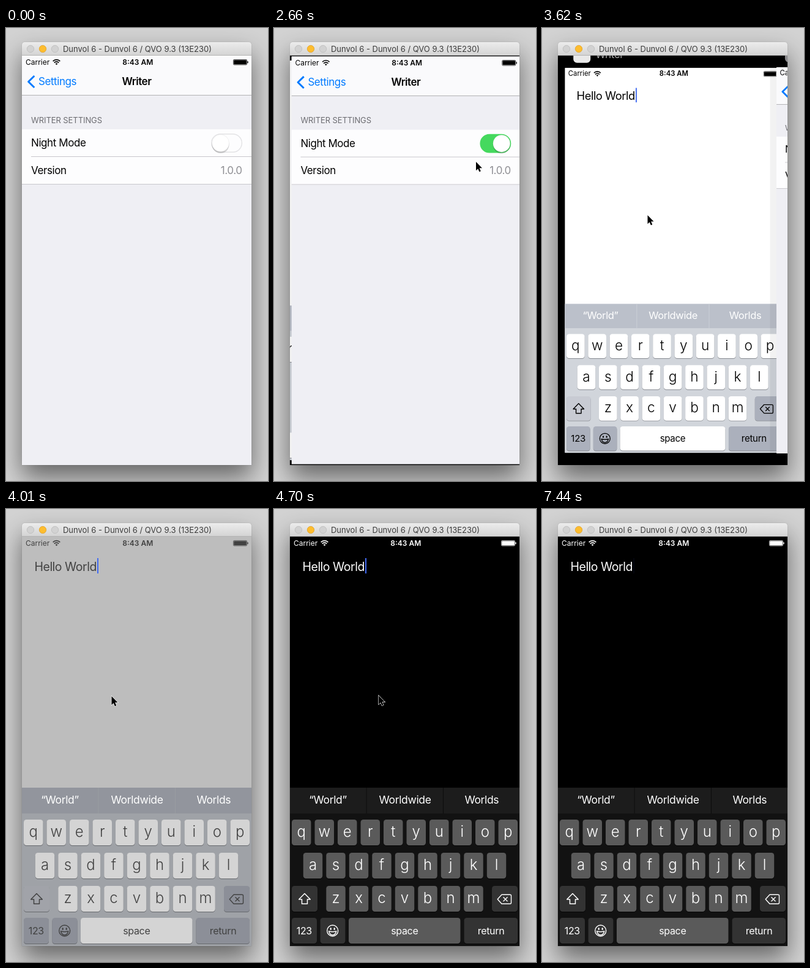
Recreate the animation shown at these times as an HTML page. Size 428 by 738 pixels, loop 7480 ms.

```html
<!DOCTYPE html>
<html lang="en">
<head>
<meta charset="utf-8">
<title>Night mode</title>
<style>
  html, body { margin: 0; width: 100%; height: 100%; overflow: hidden; background: #d3d3d3; }
  #window { position: absolute; left: 26px; top: 23px; width: 375px; height: 689px; border-radius: 5px 5px 0 0;
    box-shadow: 0 0 1px rgba(0,0,0,.5), 0 20px 42px rgba(0,0,0,.52); }
  svg { position: absolute; left: 0; top: 0; width: 428px; height: 738px; display: block; }
  text { font-family: Inter, Roboto, sans-serif; white-space: pre; }
</style>
</head>
<body>
<div id="window"></div>
<svg id="stage" viewBox="0 0 428 738"></svg>
<script>
const LOOP = 7480;

// ---- drawing helpers ----
const rect = (x, y, w, h, fill, extra = '') =>
  `<rect x="${x}" y="${y}" width="${w}" height="${h}" fill="${fill}" ${extra}/>`;
const text = (x, y, size, fill, str, extra = '', track = -.025) =>
  `<text x="${x}" y="${y}" font-size="${size}" fill="${fill}" letter-spacing="${track * size}" ${extra}>${str}</text>`;
const line = (d, color, width) =>
  `<path d="${d}" fill="none" stroke="${color}" stroke-width="${width}" stroke-linejoin="round"/>`;
const MID = 'text-anchor="middle"';

function statusBar(color) {
  return `<g class="status">` +
    text(6, 14.5, 12, color, 'Carrier', '', 0) +
    `<g transform="translate(56.5 14.5)">` +
      line('M-5.8-5.4A8 8 0 0 1 5.8-5.4M-3.7-2.9A5 5 0 0 1 3.7-2.9', color, 1.7) +
      `<path d="M-1.9-1.3Q0-3 1.9-1.3L0 .7Z" fill="${color}"/></g>` +
    text(189.3, 14.5, 12, color, '8:43 AM', MID + ' font-weight="600"', 0) +
    rect(345.4, 6.4, 22.2, 8.6, 'none', `rx="1.5" stroke="${color}" stroke-width=".7"`) +
    rect(346.2, 7.2, 20.6, 7, color, 'rx=".8"') +
    rect(368.2, 9.2, 1.4, 3, color) + `</g>`;
}

function settingsScreen() {
  const ink = '#000';
  return rect(0, 0, 375, 667, '#efeff4') +
    rect(0, 0, 375, 64, '#fafafc') + rect(0, 64, 375, 1, '#b2b2b4') +
    statusBar(ink) +
    line('M20.3 33L10.6 42.5L20.3 52', '#007aff', 3) +
    text(27, 48, 17, '#007aff', 'Settings') +
    text(187.5, 48, 17, ink, 'Writer', MID + ' font-weight="600"') +
    text(15, 109.5, 13, '#6d6d72', 'WRITER SETTINGS', '', -.006) +
    rect(0, 120, 375, 90, '#fdfdfe') +
    rect(15, 164, 360, 1, '#c8c7cc') + rect(0, 209, 375, 1, '#c8c7cc') +
    text(15, 148, 17, ink, 'Night Mode') +
    text(15, 193, 17, ink, 'Version') +
    text(359.5, 193, 17, '#8e8e93', '1.0.0', 'text-anchor="end"') +
    rect(309.7, 127.7, 49.6, 29.6, '#fdfdfe', 'id="track" rx="14.8" stroke="#e3e3e5" stroke-width="1.4"') +
    rect(0, 131, 28, 28, '#000', 'id="shade" rx="14" opacity=".17"') +
    rect(0, 128.5, 28, 28, '#fff', 'id="knob" rx="14" stroke="#000" stroke-opacity=".1" stroke-width=".6"');
}

const light = { bg: '#fff', ink: '#000', bar: '#bbc0ca', rule: '#cbcfd6', board: '#d1d5db',
  key: '#fff', alt: '#abb0bc', shift: '#c8cbd3', edge: '#898c92' };
const dark = { bg: '#000', ink: '#fff', bar: '#1c1c1c', rule: '#0c0c0c', board: '#121212',
  key: '#5a5a5a', alt: '#333', shift: '#333', edge: '#050505' };

function writerScreen(c) {
  const cap = (x, y, w, fill) => rect(x, y + 1, w, 42, c.edge, 'rx="4.5"') + rect(x, y, w, 42, fill, 'rx="4.5"');
  const row = (letters, x0, y) => [...letters].map((ch, i) => {
    const x = x0 + i * 37.5;
    return cap(x, y, 31.5, c.key) + text(x + 15.75, y + 28, 24, c.ink, ch, MID + ' font-weight="300"', 0);
  }).join('');
  const word = (x, str) => text(x, 435, 17.5, '#fff', str, MID, -.02);
  const label = (x, str) => text(x, 647.5, 16, c.ink, str, MID, -.02);

  return rect(0, 0, 375, 667, c.bg) + statusBar(c.ink) +
    text(20.5, 56, 19.5, c.ink, 'Hello World') +
    rect(123, 35, 2, 25, '#426bf2', 'class="caret"') +
    rect(0, 409, 375, 258, c.board) + rect(0, 409, 375, 42, c.bar) +
    rect(124.5, 409, 1, 42, c.rule) + rect(250, 409, 1, 42, c.rule) +
    word(62, '“World”') + word(188, 'Worldwide') + word(313.3, 'Worlds') +
    row('qwertyuiop', 3, 461) + row('asdfghjkl', 21.75, 515) + row('zxcvbnm', 59.25, 569) +
    cap(3, 569, 42, c.shift) + cap(330, 569, 42, c.alt) +
    cap(3, 621, 41, c.alt) + cap(49.5, 621, 41, c.alt) + cap(96, 621, 182.5, c.key) + cap(284.5, 621, 87.5, c.alt) +
    line('M24 581.5L33.3 591H28.5V598.3H19.5V591H14.7Z', c.ink, 1.5) +
    line('M346 583.3H359.5Q361.5 583.3 361.5 585.3V596.2Q361.5 598.2 359.5 598.2H346L339.2 590.7Z' +
      'M348.5 587.3L355.5 594.3M355.5 587.3L348.5 594.3', c.ink, 1.4) +
    `<g transform="translate(69.7 642)" fill="${c.ink}">` + line('M-9 0A9 9 0 1 1 9 0A9 9 0 1 1-9 0Z', c.ink, 1.4) +
      `<ellipse cx="-3" cy="-3" rx="1.2" ry="1.9"/><ellipse cx="3" cy="-3" rx="1.2" ry="1.9"/></g>` +
    `<path d="M63.7 643Q69.7 644.5 75.7 643Q74.5 649 69.7 649T63.7 643Z" fill="none" stroke="${c.ink}" stroke-width="1.4"/>` +
    label(23.3, '123') + label(187.3, 'space') + label(328.5, 'return');
}

const tag = (id, name, icon, color) => `<g id="${id}">` +
  rect(14, -36, 28, 28, icon, 'rx="6"') + text(50, -16, 17, color, name) + `</g>`;
const light_ = (x, fill, edge) =>
  `<circle cx="${x}" cy="34" r="5.7" fill="${fill}" stroke="${edge}" stroke-width=".8"/>`;

const $ = id => document.getElementById(id);
$('stage').innerHTML = `
  <defs>
    <linearGradient id="chrome" x2="0" y2="1"><stop stop-color="#ececec"/><stop offset="1" stop-color="#d3d3d3"/></linearGradient>
    <clipPath id="screen">${rect(26, 45, 375, 667, '#000')}</clipPath>
    <clipPath id="corners">${rect(0, 0, 375, 667, '#000', 'id="round"')}</clipPath>
  </defs>
  <path d="M26 45V28Q26 23 31 23H396Q401 23 401 28V45Z" fill="url(#chrome)"/>
  ${rect(26, 44, 375, 1, '#b4b4b4')}
  ${light_(40, '#d2d2d2', '#bcbcbc')}${light_(60, '#fdbd2f', '#dfa02a')}${light_(80, '#d2d2d2', '#bcbcbc')}
  ${text(214.5, 38.7, 13, '#3c3c3c', 'Dunvol 6 - Dunvol 6 / QVO 9.3 (13E230)', MID, 0)}
  <g clip-path="url(#screen)">
    ${rect(26, 45, 375, 667, '#000')}
    ${tag('writerTag', 'Writer', '#e9e9e9', '#a8a8a8')}
    <g id="writer" clip-path="url(#corners)">${writerScreen(light)}<g id="night">${writerScreen(dark)}</g></g>
    ${tag('settingsTag', 'Settings', '#8b8b8e', '#fff')}
    <g id="settings">
      ${rect(-11, 0, 16, 667, '#000', 'opacity=".05"')}
      <g clip-path="url(#corners)">${settingsScreen()}</g>
    </g>
  </g>
  <path id="cursor" d="M0 0V14.2L3.2 11.2L5.4 16.2L7.8 15.2L5.6 10.3H10Z" fill="#000" stroke="#fff" stroke-width="1.2" paint-order="stroke"/>`;

// ---- motion ----
const span = (t, a, b) => Math.min(1, Math.max(0, (t - a) / (b - a)));
const smooth = u => u * u * (3 - 2 * u);
const easeOut = (u, n) => 1 - (1 - u) ** n;
const mix = (a, b, u) => a + (b - a) * u;
const set = (id, attrs) => { for (const k in attrs) $(id).setAttribute(k, attrs[k]); };
const fadeAll = (selector, opacity) =>
  document.querySelectorAll(selector).forEach(el => el.setAttribute('opacity', opacity));

// poses are [x, scale] for: settings open, switcher settled, writer open
function placeCard(id, poses, opening, zoom) {
  const [x, s] = [0, 1].map(i => mix(mix(poses[0][i], poses[1][i], opening), poses[2][i], zoom));
  const y = 378.5 - 333.5 * s;
  set(id, { transform: `translate(${x} ${y}) scale(${s})` });
  set(id + 'Tag', { transform: `translate(${x} ${y})`, opacity: Math.min(1, opening * 1.02) });
}

function moveSwitch(t) {
  const on = smooth(span(t, 1470, 1700));
  const stretch = 7 * (smooth(span(t, 1360, 1460)) - smooth(span(t, 1580, 1730)));
  const width = 28 + stretch;
  const x = mix(310.5, 358.5 - width, on);
  const tint = (a, b) => Math.round(mix(a, b, on));
  set('knob', { x, width });
  set('shade', { x, width });
  set('track', {
    fill: `rgb(${tint(253, 69)},${tint(253, 217)},${tint(254, 94)})`,
    stroke: `rgb(${tint(227, 69)},${tint(227, 217)},${tint(229, 94)})`
  });
}

// each move: start, end, from x, y, to x, y
const moves = [
  [650, 1370, 37, 422, 356, 192],
  [1990, 2160, 356, 192, 330, 218],
  [3300, 3300.1, 172.5, 305, 172.5, 305],
  [4600, 4690, 172.5, 305, 171, 304],
  [4700, 4810, 171, 304, 50, 340]
];
function moveCursor(t) {
  const shown = (t >= 650 && t < 3070) || (t >= 3300 && t < 4810);
  set('cursor', { visibility: shown ? 'visible' : 'hidden' });
  if (!shown) return;
  const [a, b, x0, y0, x1, y1] = moves.filter(m => t >= m[0]).pop();
  const u = smooth(span(t, a, b));
  set('cursor', { transform: `translate(${mix(x0, x1, u)} ${mix(y0, y1, u)})` });
}

function caretOpacity(t) {
  if (t < 4040) return 1;
  const phase = (t - 4040) % 976;
  return 1 - smooth(span(phase, 0, 140)) + smooth(span(phase, 458, 560));
}

function draw(t) {
  const opening = easeOut(span(t, 2660, 3090), 6);
  const zoom = easeOut(span(t, 3450, 3880), 3);
  placeCard('writer', [[-104, .98], [77.4, .73], [26, 1]], opening, zoom);
  placeCard('settings', [[26, 1], [207.4, .744], [432, 1]], opening, zoom);
  set('round', { rx: 5 * opening * (1 - zoom) });
  fadeAll('.status', Math.min(1, 1 - opening + zoom * 1.3));
  fadeAll('.caret', caretOpacity(t));
  set('night', { opacity: span(t, 3915, 4290) });
  moveSwitch(t);
  moveCursor(t);
}

const start = performance.now();
function tick() {
  draw((performance.now() - start) % LOOP);
  requestAnimationFrame(tick);
}
tick();
</script>
</body>
</html>
```
